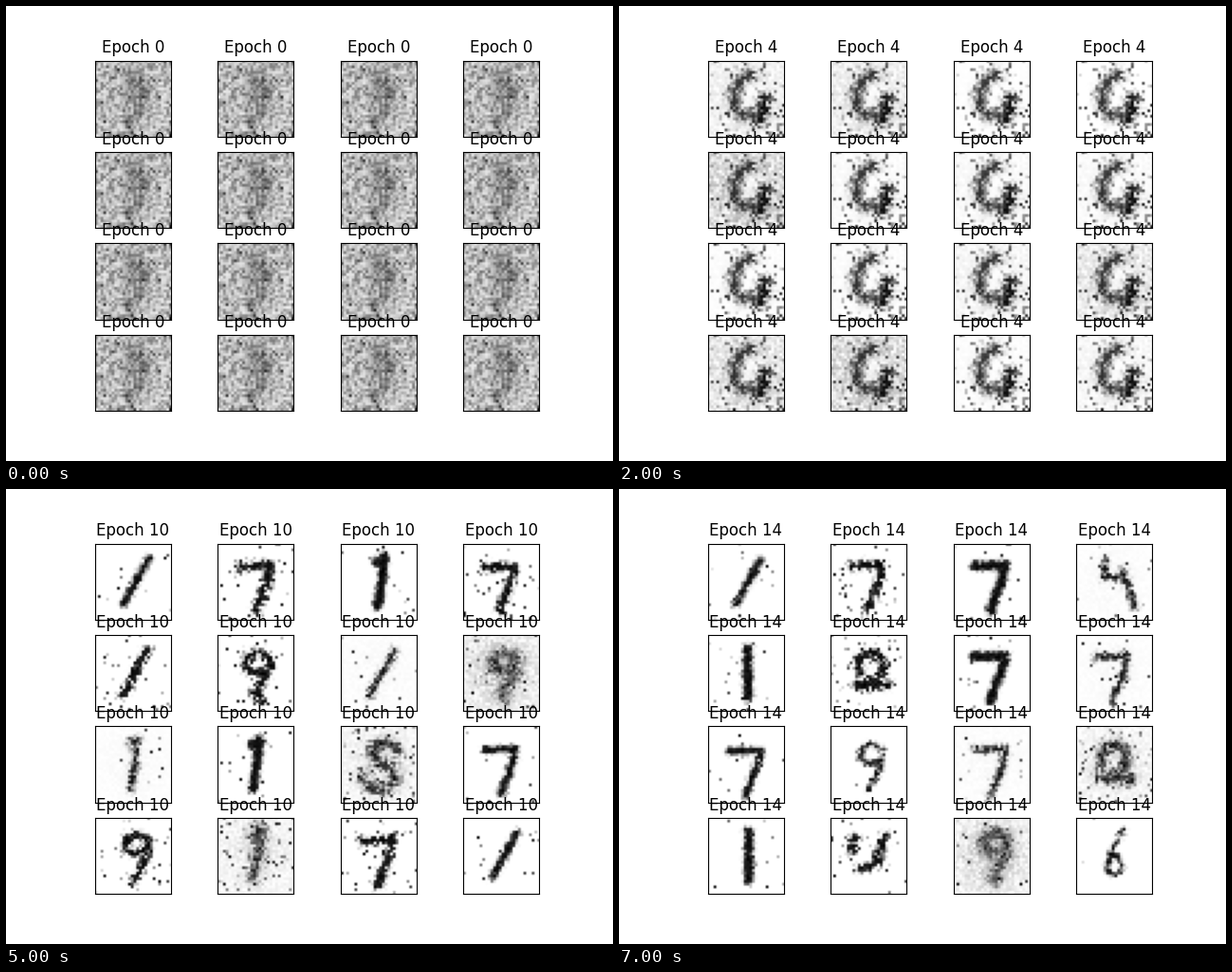
Write a matplotlib script that moves like this. It is 640x480 px and loops after 8 s.

```python
import numpy as np
import matplotlib.pyplot as plt
from matplotlib.animation import FuncAnimation

N = 28
X, Y = np.meshgrid(np.arange(N) + 0.5, np.arange(N) + 0.5)

# letter: (half width, edge roughness, speck density, fog)
STYLES = {
    "b": (1.7, 0.35, 0.015, 0),      # bold
    "m": (1.3, 0.4, 0.015, 0),       # medium
    "r": (1.4, 0.75, 0.035, 0),      # ragged
    "t": (0.7, 0.5, 0.004, 0),       # thin
    "l": (1.0, 0.6, 0.015, 0.03),    # light
    "x": (1.5, 0.9, 0.17, 0),        # messy
    "h": (1.5, 0.9, 0.08, 0.12),     # hazy
    "f": (1.7, 0.8, 0.03, 0.22),     # foggy
}


def line(*xy):
    return np.array(xy, float).reshape(-1, 2)


def arc(cx, cy, rx, ry, start=0, end=360):
    """Elliptic arc; angles grow clockwise on screen from the right."""
    a = np.radians(np.linspace(start, end, 14))
    return np.column_stack([cx + rx * np.cos(a), cy + ry * np.sin(a)])


GLYPHS = {
    "/": [line(19.5, 6, 10.5, 22)],
    "|": [line(14.8, 5.5, 14.8, 23)],
    "1": [line(15.5, 5, 15, 13, 13.3, 23), line(13, 7, 16, 6)],
    "2": [arc(14, 12, 4.6, 5, 150, 440), line(9, 18.8, 20.5, 18.8)],
    "3": [arc(14, 9.5, 4.8, 4.3, -150, 80), arc(14, 18.8, 5, 4.8, -85, 150)],
    "4": [line(11, 6, 10.5, 12, 18, 13, 17, 10), line(18, 13, 21.5, 23)],
    "5": [arc(16, 10, 4.5, 3.8, 90, 350), arc(14, 18.5, 5.5, 4.5, -70, 170)],
    "6": [line(17.5, 5, 13, 13, 12, 18), arc(14.3, 17.5, 2.5, 3.5)],
    "7": [line(8, 8.6, 19, 8.4, 17.8, 14, 13.7, 24.5)],
    "8": [arc(14.5, 10.5, 4.8, 3.7), line(18, 12, 17, 17, 13, 21, 16, 24)],
    "9": [arc(15, 10, 4, 3.5), line(19, 9, 18.5, 14, 14, 23)],
    # half-formed digits
    "F": [line(9.5, 12, 13, 7.5), line(18, 8, 20, 8),
          line(16, 14.5, 18, 18, 16, 23)],
    "K": [arc(14.5, 11.5, 4.5, 4, 180, 300), line(20, 10, 22, 8),
          line(8, 16, 18, 16.5), line(11, 18.5, 17, 18)],
    "V": [line(9, 7, 8, 12), line(20.5, 7, 17, 15), line(11, 19, 18, 16)],
}


def distance(strokes):
    """Distance from each cell to the nearest stroke segment."""
    best = np.full((N, N), 99.0)
    for pts in strokes:
        for (ax, ay), (bx, by) in zip(pts[:-1], pts[1:]):
            dx, dy = bx - ax, by - ay
            t = ((X - ax) * dx + (Y - ay) * dy) / (dx * dx + dy * dy + 1e-9)
            t = np.clip(t, 0, 1)
            best = np.minimum(best, np.hypot(X - ax - t * dx, Y - ay - t * dy))
    return best


def ink(dist, width, soft):
    return 1 / (1 + np.exp(np.clip((dist - width) / soft, -40, 40)))


def blob(cx, cy, rx, ry):
    return np.exp(-((X - cx) / rx) ** 2 - ((Y - cy) / ry) ** 2)


def over(img, layer):
    return img + layer * (1 - img)


def digit(glyph, style, rng):
    width, rough, specks, fog = STYLES[style]
    shift = rng.normal(0, 0.3, 2)
    dist = distance([pts + shift for pts in GLYPHS[glyph]])
    img = ink(dist + rng.normal(0, rough, (N, N)), width, 0.25 + 2.5 * fog)
    img *= 1 - (0.1 + 2 * fog) * rng.random((N, N))
    dots = (rng.random((N, N)) < specks) * rng.uniform(0.1, 1, (N, N))
    mist = fog * rng.random((N, N)) * (0.4 + blob(14, 14, 11, 12))
    return over(np.maximum(img, dots), mist)


def static_cells():
    """One shared noise field with a faint nine in it."""
    rng = np.random.default_rng(5)
    base = 0.1 + 0.42 * rng.random((N, N)) ** 1.4
    base += 0.3 * (rng.random((N, N)) < 0.06)
    loop = ink(distance([arc(14.5, 6.5, 3, 2.2)]), 0.9, 0.5)
    tail = ink(distance([line(17.5, 8, 18, 14, 16.5, 19, 12, 23)]), 1.6, 0.6)
    shape = np.maximum(loop, tail) * (0.2 + 0.7 * rng.random((N, N)))
    base = over(base, 0.6 * shape + 0.15 * blob(13, 12, 4, 6))
    base[-1, -1] = 0.95
    return [base + rng.normal(0, 0.02, (N, N)) for _ in range(16)]


def blob_cells():
    """A dark textured blob and fixed specks under varying haze."""
    rng = np.random.default_rng(11)
    core = np.clip(1.5 * blob(14.7, 13.5, 4.6, 8), 0, 1)
    grain = np.clip(rng.normal(0.45, 0.55, (N, N)), 0, 1)
    edge = np.clip(np.hypot((X - 14) / 14, (Y - 14) / 14), 0, 1)
    dots = (rng.random((N, N)) < 0.11 * edge) * rng.random((N, N))
    cap = ink(distance([arc(15.5, 7, 3.2, 2, 170, 370)]), 0.8, 0.3)
    dark = np.maximum(core ** 1.5 * grain, cap * (0.4 + 0.6 * grain))
    dark = np.maximum(dark, dots)
    mist = 0.3 * blob(14.5, 13.5, 6, 9) + 0.12 * rng.random((N, N))
    return [over(dark, haze * mist) for haze in rng.random(16)]


def hook_cells():
    """An open loop with a heavy lower right end, under varying haze."""
    rng = np.random.default_rng(23)
    dots = (rng.random((N, N)) < 0.14) * rng.uniform(0.1, 0.95, (N, N))
    grain = rng.normal(0, 0.9, (N, N))
    mist = 0.28 * rng.random((N, N))
    gap = 1 - 0.85 * blob(16, 12.5, 5, 5)
    bowl = [line(15.5, 5.5, 11, 8, 9.5, 12, 9.5, 17, 12, 20, 19, 20.5)]
    end = [line(20.5, 14.5, 20, 18, 19, 21.5)]
    shape = 0.85 * ink(distance(bowl) + grain, 1.4, 0.7)
    shape = np.maximum(shape, ink(distance(end) + grain, 2, 0.5))
    img = np.maximum(shape, dots * gap)
    return [over(img, haze * mist * gap) for haze in rng.random(16)]


def digit_cells(glyphs, styles, seed):
    rng = np.random.default_rng(seed)
    return [digit(g, s, rng) for g, s in zip(glyphs, styles)]


stages = [
    static_cells(),
    blob_cells(),
    hook_cells(),
    digit_cells("91|9" "FKFK" "3F33" "1K1|", "fbtx" "tmml" "fblf" "bmlt", 31),
    digit_cells("1793" "/9K1" "71F9" "3/17", "rmfb" "lrmx" "rbth" "fmlr", 41),
    digit_cells("/717" "/8/9" "1157" "917/", "mrbr" "rrlf" "lbhm" "rhrm", 53),
    digit_cells("7/19" "2|73" "9716" "/571", "bmlr" "hbmf" "trml" "mhrb", 61),
    digit_cells("/774" "|277" "7972" "|V96", "mrbl" "brbl" "mtlh" "brft", 73),
]

fig, axes = plt.subplots(4, 4, figsize=(6.4, 4.8), dpi=100)
images = []
for ax in axes.flat:
    ax.set_xticks([])
    ax.set_yticks([])
    ax.set_title("Epoch 0")
    images.append(ax.imshow(np.zeros((N, N)), cmap="gray_r", vmin=0, vmax=1))


def update(i):
    for ax, image, cell in zip(axes.flat, images, stages[i]):
        image.set_data(np.clip(cell, 0, 1))
        ax.title.set_text(f"Epoch {2 * i}")
    return images


anim = FuncAnimation(fig, update, frames=len(stages), interval=1000,
                     repeat=True, repeat_delay=0, blit=False)
plt.show()
```
